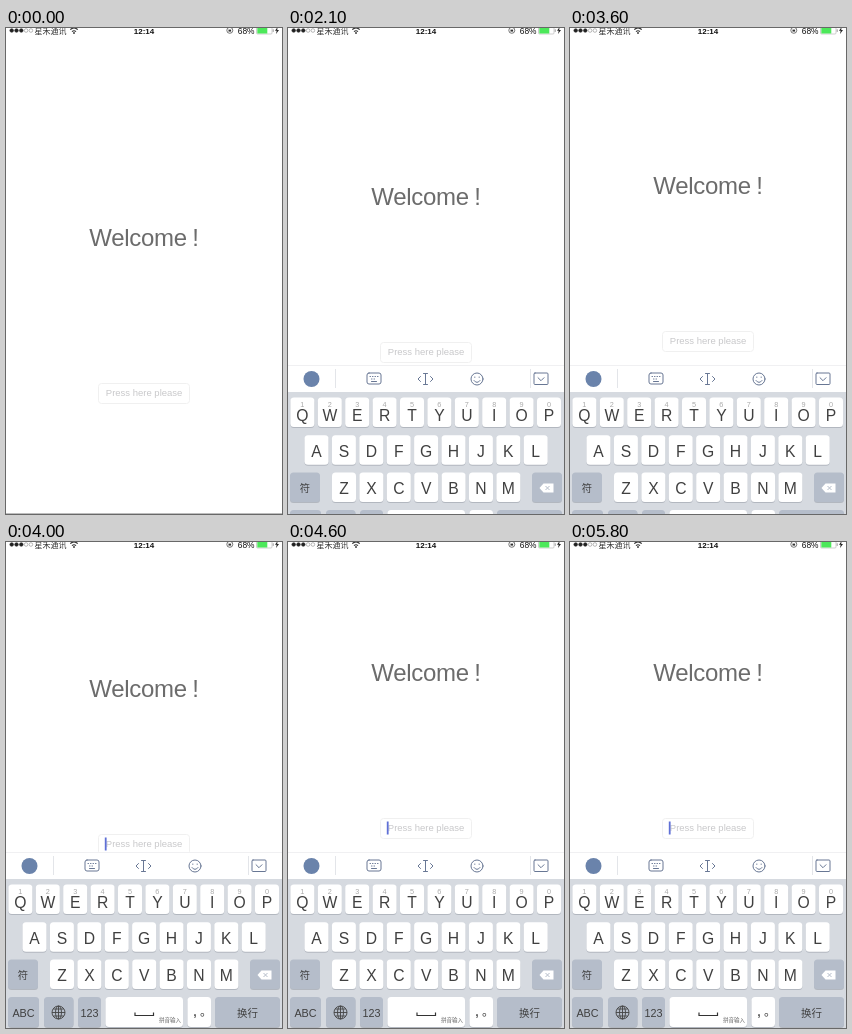
Recreate the animation shown at these times as an HTML page. Size 276 px wide and 486 px high, loop 6100 ms.

```html
<!DOCTYPE html>
<html lang="en">
<head>
<meta charset="utf-8">
<title>Welcome</title>
<style>
  html, body { margin: 0; width: 100%; height: 100%; overflow: hidden; background: #fff; }
  svg { display: block; width: 276px; height: 486px; }
  text { font-family: "Liberation Sans", Arial, sans-serif; }
  .cjk { font-family: "Noto Sans CJK SC", "Noto Sans CJK", sans-serif; }
  .mid { text-anchor: middle; }
  .line { fill: none; stroke: #687794; stroke-width: 1; stroke-linecap: round; stroke-linejoin: round; }
  .dark { fill: none; stroke: #444; stroke-width: .9; }
  #form, #keyboard, #caret { animation: 6100ms step-end infinite; }
  #form { animation-name: form; }
  #keyboard { animation-name: keyboard; }
  #caret { animation-name: caret; }
  @keyframes form {
    0% { transform: translateY(0); }
    34.426% { transform: translateY(-41px); }
    45.901% { transform: translateY(-52px); }
    65.573% { transform: translateY(-63px); }
    75.409%, 100% { transform: translateY(-79px); }
  }
  @keyframes keyboard {
    0% { transform: translateY(180px); }
    34.426% { transform: translateY(27px); }
    65.573%, 100% { transform: translateY(0); }
  }
  @keyframes caret {
    0% { opacity: 0; }
    4.918% { opacity: 1; }
    34.426% { opacity: 0; }
    65.573% { opacity: 1; }
    86.885% { opacity: 0; }
    95.081%, 100% { opacity: 1; }
  }
</style>
</head>
<body>
<svg viewBox="0 0 276 486">
  <rect width="276" height="486" fill="#fff"/>
  <path d="M0 485.5H276" stroke="#bdbdbd"/>

  <g id="status">
    <g id="signal" stroke-width=".6"></g>
    <text class="cjk" x="28.5" y="5.8" font-size="8" fill="#333">星禾通讯</text>
    <g fill="none" stroke="#333" stroke-width="1.1">
      <path d="M64.3 1.6Q68 -1.8 71.7 1.6M66 3.6Q68 1.8 70 3.6"/>
      <circle cx="68" cy="5" r=".4"/>
    </g>
    <text class="mid" x="138" y="5.6" font-size="8" font-weight="bold" fill="#111">12:14</text>
    <circle cx="223.8" cy="2.3" r="3" fill="none" stroke="#555" stroke-width=".8"/>
    <path d="M222.5 1.6h2.6v2h-2.6z" fill="#333"/>
    <text x="231.800" y="5.6" font-size="8.4" fill="#111">68%</text>
    <rect x="250.5" y="-1" width="15.5" height="7" rx="1" fill="#fff" stroke="#bbb" stroke-width=".7"/>
    <rect x="251.3" y="-.5" width="10" height="6" fill="#4ce85a"/>
    <path d="M267.2 1.3v2.6" stroke="#999"/>
    <path d="M271.6 -1L269 2.8h1.7l-.7 3.2L273 2h-1.8z" fill="#222"/>
  </g>

  <g id="form">
    <text x="83.3" y="217.5" font-size="24" letter-spacing="-.3" word-spacing="-1" fill="#6c6c6c">Welcome !</text>
    <rect x="92.5" y="355.5" width="91" height="20" rx="3" fill="#fff" stroke="#f0f0f0"/>
    <text x="99.800" y="368" font-size="9.5" fill="#c8c8ca">Press here please</text>
    <rect id="caret" x="98.800" y="358.5" width="1.8" height="13" fill="#5f70d6"/>
  </g>

  <g id="keyboard">
    <rect y="310" width="276" height="28" fill="#fff"/>
    <path d="M0 310.5H276" stroke="#f0f0f2"/>
    <path d="M47.5 314V333M242.5 314V333" stroke="#e3e5e9"/>
    <circle cx="23.5" cy="324" r="8" fill="#6a83ab"/>
    <g class="line">
      <rect x="79" y="318" width="14" height="11" rx="2"/>
      <path d="M82 321.5H90M83.5 324H88.5" stroke-dasharray=".5 2"/>
      <path d="M83.5 326.5h5"/>
      <path d="M137.5 319V329M135.5 318.5h4M135.5 329.5h4M132.5 321.5l-2.5 2.5 2.5 2.5M142.5 321.5l2.5 2.5-2.5 2.5"/>
      <circle cx="189" cy="324" r="6"/>
      <path d="M186 325.5Q189 329.5 192 325.5M186.8 322v.4M191.2 322v.4"/>
      <rect x="246" y="318" width="14" height="11.5" rx="1"/>
      <path d="M250 322.7l3 3 3-3"/>
    </g>
    <rect y="337" width="276" height="149" fill="#d6dae0"/>
    <g id="keys"></g>
    <path d="M251.5 433l4-4.5h10v9h-10z" fill="#fff"/>
    <path d="M257.5 431l4 4m0-4l-4 4" stroke="#b5bdca"/>
    <g class="dark">
      <circle cx="52.5" cy="470.5" r="6.5"/>
      <ellipse cx="52.5" cy="470.5" rx="3" ry="6.5"/>
      <path d="M46 470.5H59M52.5 464V477M47.3 467H57.7M47.3 474H57.7"/>
    </g>
    <path d="M129 470.5v3h18.500v-3" fill="none" stroke="#333" stroke-width="1.2"/>
    <text class="cjk" x="153" y="480.300" font-size="5.5" fill="#666">拼音输入</text>
  </g>
</svg>
<script>
  const PITCH = 27.4;
  const GREY = '#b5bdca';
  const INK = '#404040';

  const text = (label, x, y, size, fill = INK, cls = '') =>
    `<text class="mid ${cls}" x="${x}" y="${y}" font-size="${size}" fill="${fill}">${label}</text>`;

  const key = (x, y, w, h, fill = '#fff') =>
    `<rect x="${x}" y="${y + 1}" width="${w}" height="${h}" rx="3.5" fill="#b2b7bf"/>` +
    `<rect x="${x}" y="${y}" width="${w}" height="${h}" rx="3.5" fill="${fill}"/>`;

  const row = (letters, center, top, base, digits = '') =>
    [...letters].map((letter, i) => {
      const x = center + i * PITCH;
      return key(x - 12, top, 24, 29.5) + text(letter, x, base, 15.7) +
        (digits ? text(digits[i], x, 351.5, 7.3, '#aaa') : '');
    }).join('');

  document.getElementById('keys').innerHTML =
    row('QWERTYUIOP', 14.4, 342.5, 365.6, '1234567890') +
    row('ASDFGHJKL', 28.5, 380.3, 401.5) +
    row('ZXCVBNM', 56, 417.5, 438.8) +
    key(2, 417.5, 30, 29.5, GREY) + text('符', 17, 437, 10.3, INK, 'cjk') +
    key(244, 417.5, 30, 29.5, GREY) +
    key(2, 455, 31, 30, GREY) + text('ABC', 17.5, 474.5, 10.8) +
    key(38, 455, 29.5, 30, GREY) +
    key(72, 455, 23, 30, GREY) + text('123', 83.5, 474.5, 10.8) +
    key(99.5, 455, 77.5, 30) +
    key(181.5, 455, 23.5, 30) + text(',', 189, 473.5, 16) + text('。', 200, 474, 12, INK, 'cjk') +
    key(209, 455, 65, 30, GREY) + text('换行', 241.5, 474.5, 10.5, INK, 'cjk');

  document.getElementById('signal').innerHTML = [0, 1, 2, 3, 4].map(i => {
    const [fill, stroke] = i < 3 ? ['#222', '#222'] : ['#fff', '#888'];
    return `<circle cx="${5.7 + i * 4.8}" cy="2.5" r="1.8" fill="${fill}" stroke="${stroke}"/>`;
  }).join('');
</script>
</body>
</html>
```
